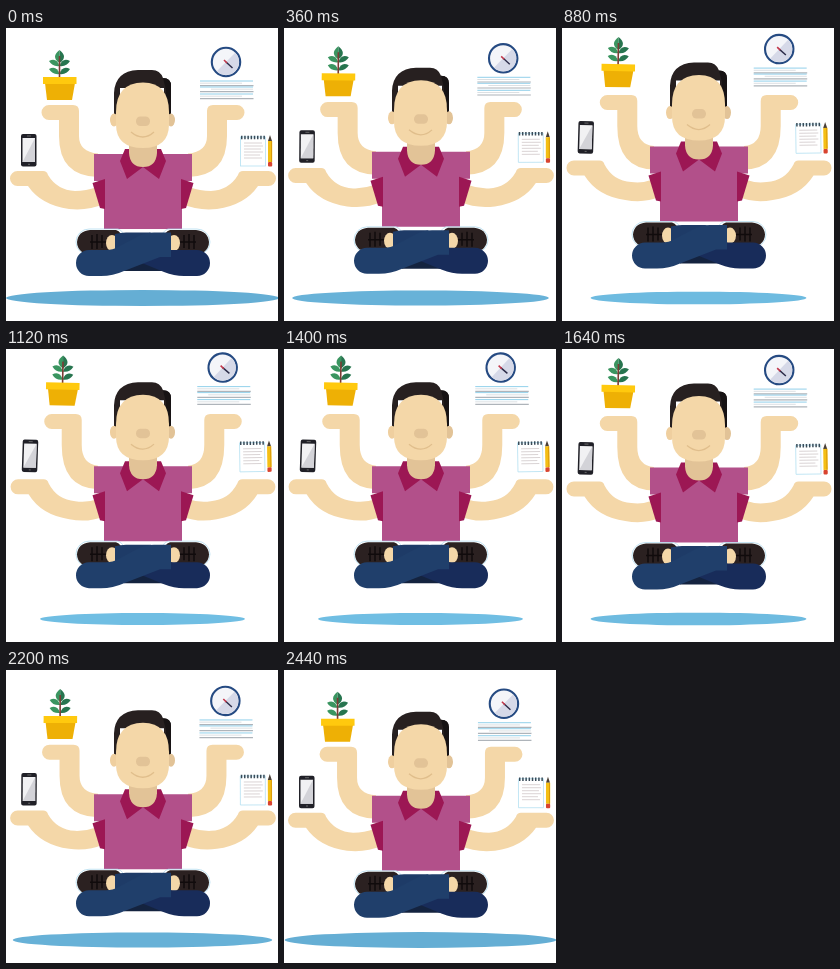
These frames come from a looping animation (272 px wide and 293 px high, 2520 ms). An HTML page:

```html
<!DOCTYPE html>
<html lang="en">
<head>
<meta charset="utf-8">
<title>Floating multitasker</title>
<style>
html, body { margin: 0; width: 100%; height: 100%; overflow: hidden; background: #fff; }
svg { display: block; width: 100%; height: 100%; }
</style>
</head>
<body>
<svg viewBox="0 0 272 293">
  <defs>
    <g id="arms" fill="#f4d7a8"><path id="upper"/><path id="lower"/></g>
    <path id="sleeve" d="M86.500 155L99 151V181L94 180Z"/>
    <g id="shoe">
      <path d="M83 201H112Q118 203 118 210V227H83A13 13 0 0 1 83 201Z" fill="#fff" stroke="#a9d9ee" stroke-width=".7"/>
      <path d="M84 202H110Q116 204 116 211V224H76Q71 220 71 214Q72 203 84 202Z" fill="#2b2121"/>
      <path d="M86 207V221M91 206V221M96 207V220M84 214H101" stroke="#100b0c" stroke-width="1.500" fill="none"/>
      <ellipse cx="106" cy="215" rx="6" ry="8" fill="#f4d7a8"/>
    </g>
  </defs>

  <ellipse id="shadow" cx="136.500" cy="270"/>

  <g id="body">
    <use href="#arms"/><use href="#arms" transform="matrix(-1 0 0 1 274 0)"/>
    <path d="M88 126H186V153H176V201H98V153H88Z" fill="#b2508a"/>
    <g fill="#9c1754">
      <use href="#sleeve"/><use href="#sleeve" transform="matrix(-1 0 0 1 274 0)"/>
      <path d="M119 121L114 133L121 151L137 139L153 151L160 133L155 121Z"/>
    </g>
    <path d="M123 110H151V125Q150 139 137 139Q124 139 123 125Z" fill="#e2c397"/>

    <path d="M108 89V65Q109 43 132 42H146Q154 42 157 50Q165 50 165 58V90H158V60H114V89Z" fill="#272020"/>
    <path d="M157 50Q165 50 165 58V90H160V62Z" fill="#171314"/>
    <ellipse cx="108" cy="92" rx="4" ry="6.500" fill="#efcf9f"/>
    <ellipse cx="165" cy="92" rx="4" ry="6.500" fill="#e2c397"/>
    <path d="M110 84Q110 55 137 54.500Q163 55 163 84V96Q163 120 137 120Q110 120 110 96Z" fill="#f4d7a8"/>
    <rect x="130" y="88.500" width="14" height="9.500" rx="4.500" fill="#e2c397"/>
    <path d="M125 104Q137 114 148 104" fill="none" stroke="#e0be8c" stroke-width="1.300"/>

    <path d="M115 224H160V243H118Z" fill="#14233f"/>
    <use href="#shoe"/><use href="#shoe" transform="matrix(-1 0 0 1 274 0)"/>
    <path d="M109 206L165 222H191A13 13 0 0 1 191 248H178Q168 248 158 244L109 224Z" fill="#182c5a"/>
    <path d="M109 206Q114 204.500 120 204.500H145L112 224H109Z" fill="#1e3b67"/>
    <path d="M83 222H100Q107 222 112 219L131 209Q139 204.500 148 204.500H165V229H154L118 243Q107 248 95 248H83A13 13 0 0 1 83 222Z" fill="#203f6b"/>
  </g>

  <g id="plant">
    <g id="leaves"></g>
    <path d="M53.500 28V50" stroke="#7c3b34" stroke-width="1.600"/>
    <path d="M39 55H69L66 72H41Z" fill="#eeb005"/>
    <rect x="37" y="49" width="33.500" height="7" fill="#ffc90e"/>
  </g>

  <g id="phone">
    <rect x="15" y="106" width="15.500" height="32.500" rx="2" fill="#202027"/>
    <rect x="16.500" y="110" width="12.500" height="24" fill="#f1f1f3"/>
    <path d="M29 110V134H16.500Z" fill="#d3d3d8"/>
    <path d="M21 108H25M22 136.300H24" stroke="#777" stroke-width=".8"/>
  </g>

  <g id="clock">
    <circle cx="220" cy="34" r="14.200" fill="#f4f5f9" stroke="#254a82" stroke-width="2.100"/>
    <path d="M229.200 24.800A13 13 0 0 1 210.800 43.200Z" fill="#d6d9e8"/>
    <path d="M220 34L226.500 40" stroke="#2b2b48" stroke-width="1.400"/>
    <path d="M218 32L221 35" stroke="#c2364a" stroke-width="1.600"/>
  </g>
  <g id="papers"></g>

  <g id="pad">
    <rect x="234.500" y="109" width="25" height="29" fill="#fff" stroke="#b4e0f2" stroke-width=".8"/>
    <path d="M235 109.500H260" stroke="#394b58" stroke-width="3.500" stroke-dasharray="1.500 1.700"/>
    <path d="M238 115H256M238 118H257M238 121H255M238 124H257M238 127H254M238 130H256" stroke="#d6cfd0" stroke-width=".9"/>
    <path d="M262 113L264 107L266 113Z" fill="#4a4038"/>
    <rect x="262" y="113" width="4.200" height="21" fill="#f4bf16"/>
    <path d="M265.500 113V134" stroke="#d99a0a"/>
    <rect x="262" y="134" width="4.200" height="4.500" rx="1" fill="#d8432f"/>
  </g>
</svg>
<script>
const LOOP = 2520, STEP = 40, LAST = 2440;
const el = id => document.getElementById(id);
const set = (node, attrs) => {
  for (const key in attrs) node.setAttribute(key, attrs[key]);
};
const mix = (a, b, k) => a + (b - a) * k;

// Leaf pairs along the stem, then the top leaf
const GREENS = ['#3a9560', '#27754f'];
const leafPair = y => [-1, 1].map((s, i) =>
  `<path d="M53.5 ${y}Q${53.5 + s * 3} ${y - 9} ${53.5 + s * 10.5} ${y - 5}Q${53.5 + s * 7} ${y + 1} 53.5 ${y}Z" fill="${GREENS[i]}"/>`
).join('');
el('leaves').innerHTML = leafPair(46) + leafPair(38) +
  [-1, 1].map((s, i) => `<path d="M53.5 22Q${53.5 + s * 9} 29 53.5 35Z" fill="${GREENS[i]}"/>`).join('');

el('papers').innerHTML = [53, 59, 66].map((y, i) =>
  `<path d="M194 ${y}h53" stroke="#86cbe8" stroke-width=".9"/>
   <path d="M${i === 1 ? 205 : 194} ${y + 2.2}h42" stroke="#d4d8dc" stroke-width=".8"/>
   <path d="M194 ${y + 4.7}h53.5" stroke="#aeb4ba" stroke-width="1.2"/>`
).join('');

// id, sideways drift, lean in degrees, own centre
const props = [
  ['plant', 3.2, 1.2, 53.5, 48],
  ['phone', 1.3, 2, 23, 122],
  ['clock', -3.4, -2, 220, 34],
  ['papers', -2.8, 0, 221, 62],
  ['pad', -.8, -1, 250, 123]
];

// The hands rise a little further than the shoulders, bending the arms
function bendArms(k) {
  const hi = (x, y) => `${x + 2.8 * k} ${y - 3.2 * k}`;
  const lo = (x, y) => `${x + .6 * k} ${y - 3.9 * k}`;
  const mid = (x, y) => `${x + .3 * k} ${y - 2 * k}`;
  set(el('upper'), {
    d: `M${hi(43, 77)}L${hi(67, 77)}Q${hi(73, 77)} ${hi(73, 83)}L${hi(73, 108)}` +
      `Q${73 + 2.8 * k} 124 92 125.500V149Q${53 + 2.8 * k} 148 ${hi(53, 108)}` +
      `L${hi(53, 92)}L${hi(43, 92)}A7.500 7.500 0 0 1 ${hi(43, 77)}Z`
  });
  set(el('lower'), {
    d: `M${lo(11.5, 143)}L${lo(37, 143)}Q${lo(41, 143)} ${lo(42, 147)}` +
      `Q${mid(51, 162)} ${mid(69, 163)}Q80 163 91 159L98 176Q82 183 ${mid(63, 181)}` +
      `Q${mid(35, 177)} ${lo(22, 158)}L${lo(11.5, 158)}A7.500 7.500 0 0 1 ${lo(11.5, 143)}Z`
  });
}

function draw(ms) {
  const t = Math.min(Math.floor(ms % LOOP / STEP) * STEP, LAST);
  const lift = Math.pow((1 - Math.cos(2 * Math.PI * t / LOOP)) / 2, .87);
  set(el('body'), { transform: `translate(0 ${-9.1 * lift})` });
  bendArms(lift);
  props.forEach(([id, dx, lean, x, y]) => set(el(id), {
    transform: `translate(${dx * lift} ${-15.8 * lift}) rotate(${lean * lift} ${x} ${y})`
  }));
  set(el('shadow'), {
    rx: mix(136.5, 101.5, lift),
    ry: mix(8, 6, lift),
    fill: `rgb(${mix(101, 112, lift)},${mix(174, 190, lift)},${mix(212, 227, lift)})`
  });
}

const start = performance.now();
function tick() {
  draw(performance.now() - start);
  requestAnimationFrame(tick);
}
tick();
</script>
</body>
</html>
```
